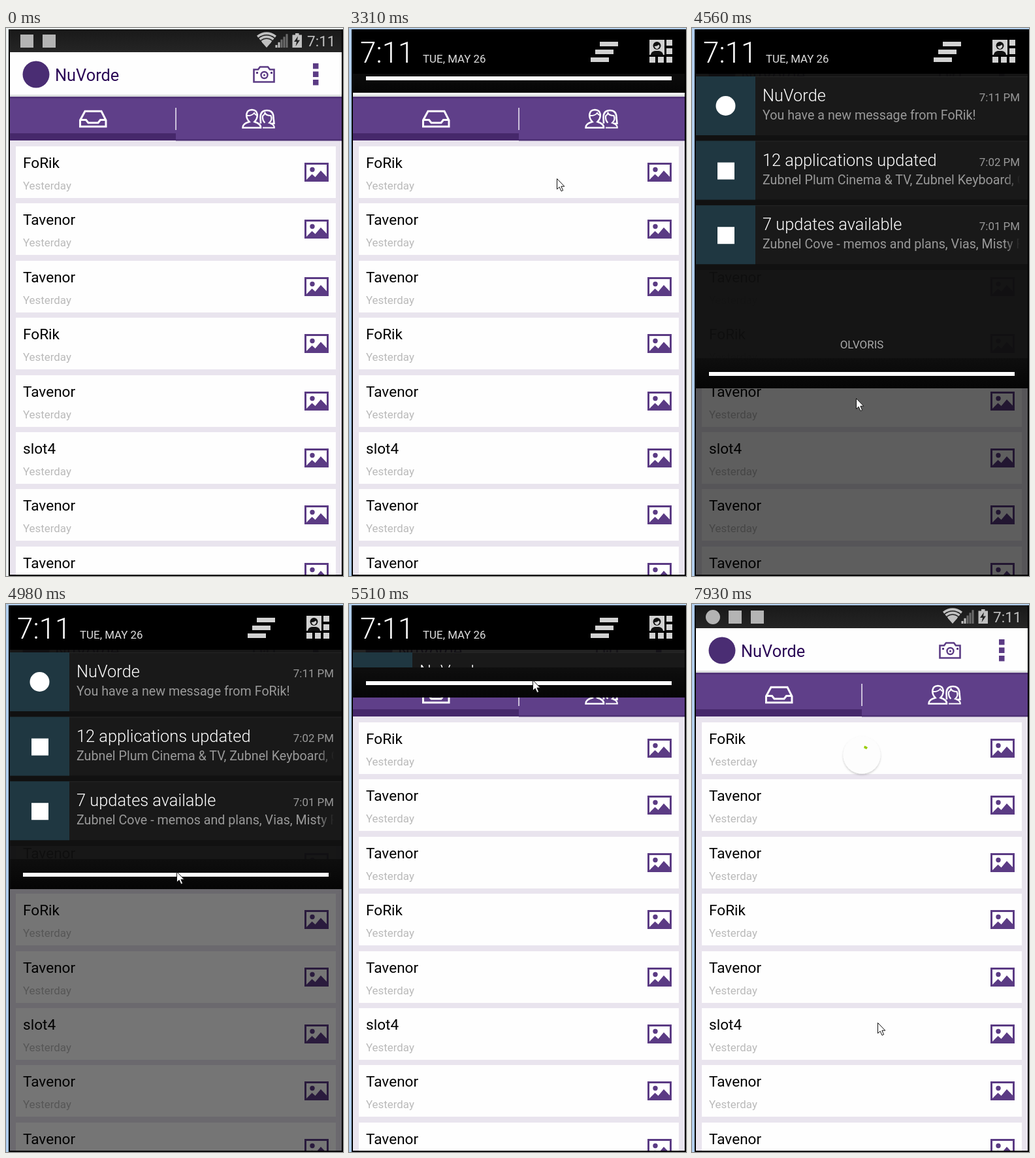
Animation of 516 by 838 pixels, one loop 8000 ms. Source, as an HTML page:

```html
<!DOCTYPE html>
<html lang="en">
<head>
<meta charset="utf-8">
<title>Notification demo</title>
<style>
html, body { margin: 0; width: 100%; height: 100%; overflow: hidden; }
svg { display: block; width: 516px; height: 838px; font-family: Roboto, sans-serif; }
text { white-space: pre; }
.light { font-weight: 300; }
</style>
</head>
<body>
<svg id="stage" viewBox="0 0 516 838"></svg>
<script>
const LOOP = 8000;
const PURPLE = '#5b3b84';
const APP = 'NuVorde';
const NOTE = 'You have a new message from FoRik!';

const text = (x, y, size, fill, str, extra = '') =>
  `<text x="${x}" y="${y}" font-size="${size}" fill="${fill}" ${extra}>${str.replace('&', '&amp;')}</text>`;
const rect = (x, y, w, h, fill, extra = '') =>
  `<rect x="${x}" y="${y}" width="${w}" height="${h}" fill="${fill}" ${extra}/>`;
const dot = (x, y, r, fill) => `<circle cx="${x}" cy="${y}" r="${r}" fill="${fill}"/>`;
const line = (d, stroke, width) =>
  `<path d="${d}" fill="none" stroke="${stroke}" stroke-width="${width}"/>`;
const shape = (d, fill) => `<path d="${d}" fill="${fill}"/>`;
const repeat = (n, make) => Array.from({ length: n }, (_, i) => make(i)).join('');

function card(name, i) {
  return `<g transform="translate(0 ${Math.round(181 + 87.4 * i)})">
    ${rect(15, 0, 490, 79, '#fefefe')}
    ${text(26, 33, 22.6, '#000', name)}
    ${text(26, 66, 16.9, '#bababa', 'Yesterday')}
    <rect x="458.5" y="26.5" width="34" height="26" fill="#fff" stroke="${PURPLE}" stroke-width="3"/>
    ${dot(469, 35.5, 3.7, PURPLE)}
    ${shape('M459 52L468.5 42.5 473.5 47 482 37 492 47.5V52Z', PURPLE)}
  </g>`;
}

function actionBar() {
  return rect(6, 37, 508, 66, '#fefefe') + rect(6, 102, 508, 3, '#dcdfdf') +
    dot(46, 71, 20.5, '#4a2d73') + text(75, 81, 25.4, '#2c0a57', APP) +
    line('M379.5 63.5H386L389 59.5H401L404 63.5H410.5V82.5H379.5Z', PURPLE, 2.6) +
    `<circle cx="395.5" cy="72" r="5" fill="none" stroke="${PURPLE}" stroke-width="2.4"/>` +
    dot(395.5, 72, 1.6, PURPLE) + rect(383, 67, 3, 3, PURPLE) + rect(405, 67, 3, 3, PURPLE) +
    repeat(3, i => rect(470, 54 + 12.5 * i, 8.5, 8.5, PURPLE));
}

function tabs() {
  const white = '#fdfcff';
  return rect(6, 105, 508, 67, '#5f3f89') + rect(6, 105, 508, 3, '#523579') +
    rect(6, 161, 254, 11, '#46286b') + rect(260, 170, 254, 2.5, '#4d3074') +
    rect(259.2, 122, 1.8, 34, '#d8cfe4') +
    line('M113.5 141L121 127.2H146L153 141V150.8H113.5ZM113.5 140.5H122.5L126 145H141L144.5 140.5H153', white, 3) +
    line('M362.5 152.5C362 147 367 145 372.5 143.5C366.5 137 366 125.5 376.5 125C387 125.5 386.5 137 380.5 143.5C385 145 390.5 147 390 152.5Z', white, 2.6) +
    line('M368.5 134C374 134.5 378 132.5 380 130C381.5 132.5 383 133.5 385 134', white, 2) +
    line('M390 146L389.5 137C389.5 129 394 126 399.5 126C405 126 409.5 129 409.5 137L410.5 146H405', white, 2.6) +
    line('M393 152.5H410.8C411 148.5 407.5 146.5 403 145C407.5 141 407 137 405.5 134C401 134 397.5 132 396.5 130C395.5 133 394 134 393 134.5C392.5 139 393 142 396.5 145', white, 2.2);
}

function statusRight() {
  const grey = '#c0c0c0';
  const wifi = repeat(3, i => {
    const r = 24 - 5.7 * i, dx = r * 0.58, y = 30 - r * 0.7;
    return line(`M${399 - dx} ${y}Q399 ${y - r * 0.42} ${399 + dx} ${y}`, grey, 3.6);
  });
  const bars = repeat(5, i =>
    rect(412.5 + i * 4, 26 - i * 4.2, 3, 4 + i * 4.2, i < 2 ? grey : '#6c6c6c'));
  return wifi + shape('M392 22Q399 16.5 406 22L399 30Z', grey) + bars +
    rect(443, 8, 5.5, 3, grey) + rect(438.5, 10.5, 14.5, 19.5, grey) +
    shape('M447 12.5L441 21H445L443.5 28 450 18.5H446Z', '#222') +
    text(461, 28, 22.6, grey, '7:11');
}

const statusSquares = x => repeat(2, i => rect(x + 34 * i, 10, 20, 20, '#b4b4b4'));

function noteRow(i, title, body, time, icon) {
  return `<g transform="translate(0 ${74 + 98.6 * i})">
    ${rect(6, 0, 508, 90, '#191919')}${rect(97, 0, 417, 1, '#252525')}
    ${rect(6, 90, 508, 8.6, '#111')}${rect(6, 0, 91, 90, '#1f3741')}${icon}
    ${text(108, 38, 25.4, '#fff', title, 'class="light"')}
    ${text(502, 38, 16.9, '#999', time, 'text-anchor="end"')}
    ${text(108, 66, 19.7, '#999', body)}
    ${rect(478, 45, 36, 30, 'url(#fade)')}
  </g>`;
}

function panelHeader() {
  const grey = '#d2d2d2';
  const tile = (col, row) => rect(460 + 13 * col, 18 + 13 * row, 9, 9, grey);
  return rect(6, 2, 508, 68, '#000') +
    text(17, 53, 44, '#fff', '7:11', 'class="light"') +
    text(113, 53, 16.9, '#ddd', 'TUE, MAY 26') +
    repeat(3, i => rect(384 - i * 7, 21 + i * 12, 28, 7, grey)) +
    repeat(3, i => tile(i, 2)) + repeat(2, i => tile(2, i)) +
    rect(460, 18, 23, 23, grey) + dot(471.5, 27, 6, '#111') +
    shape('M462 41C463 35 468 35 471.5 35S480 35 481 41Z', '#111') +
    shape('M467.5 28Q471.5 28 474.5 25.5L475.5 28Q471.5 36 467.5 28Z', grey);
}

const names = ['FoRik', 'Tavenor', 'Tavenor', 'FoRik', 'Tavenor', 'slot4', 'Tavenor', 'Tavenor'];
const square = rect(39, 33, 26, 26, '#fff');

document.getElementById('stage').innerHTML = `
<defs>
  <linearGradient id="fade"><stop stop-color="#191919" stop-opacity="0"/><stop offset=".67" stop-color="#191919"/></linearGradient>
  <linearGradient id="bar" x2="0" y2="1"><stop stop-color="#191919"/><stop offset="1" stop-color="#252525"/></linearGradient>
  <linearGradient id="foot" x2="0" y2="1"><stop stop-color="#0e0e0e"/><stop offset="1" stop-color="#050505"/></linearGradient>
  <filter id="shadow" x="-30%" y="-30%" width="160%" height="160%"><feDropShadow dx="0" dy="1.8" stdDeviation="1.8" flood-opacity=".2"/></filter>
  <clipPath id="barClip"><rect x="6" y="2" width="508" height="35"/></clipPath>
  <clipPath id="panelClip"><rect id="panelBox" x="6" y="2" width="508"/></clipPath>
  <clipPath id="rowsClip"><rect id="rowsBox" x="6" y="70" width="508"/></clipPath>
</defs>
<rect id="edge" width="516" height="838"/>
${rect(4, 2, 512, 836, '#000')}
${rect(6, 172, 508, 664, '#e9e4ee')}
${names.map(card).join('')}
${actionBar()}${tabs()}
<g id="spinner"><circle r="28.5" fill="#fdfdfd" filter="url(#shadow)"/>
  <path id="arc" fill="none" stroke="#99cc00" stroke-width="3.6"/>
  <path id="head" d="M-5 0H5L0 6Z" fill="#99cc00"/></g>
<g clip-path="url(#barClip)">
  ${rect(6, 2, 508, 35, 'url(#bar)')}
  <rect id="tickerBack" x="6" y="2" width="508" height="35"/>
  <g id="icons">
    <g id="before">${statusSquares(22)}</g>
    <g id="after">${dot(32, 20, 11, '#b4b4b4')}${statusSquares(56)}</g>
    ${statusRight()}
  </g>
  <g id="ticker">${dot(32, 19, 11, '#fff')}${text(55, 26, 19.7, '#fff', APP + ': ' + NOTE)}</g>
</g>
<rect id="scrim" x="6" y="2" width="508" height="834"/>
<g id="panel" clip-path="url(#panelClip)">
  ${rect(6, 70, 508, 766, '#101010', 'opacity=".92"')}
  <g clip-path="url(#rowsClip)">
    ${noteRow(0, APP, NOTE, '7:11 PM', dot(51.5, 45, 15, '#fff'))}
    ${noteRow(1, '12 applications updated', 'Zubnel Plum Cinema & TV, Zubnel Keyboard, Co', '7:02 PM', square)}
    ${noteRow(2, '7 updates available', 'Zubnel Cove - memos and plans, Vias, Misty Ro', '7:01 PM', square)}
    ${text(260, 490, 16.9, '#aaa', 'OLVORIS', 'text-anchor="middle"')}
  </g>
  <g id="footer">${rect(6, -46, 508, 46, 'url(#foot)', 'opacity=".97"')}${rect(26, -25, 468, 6, '#fff')}</g>
  ${panelHeader()}
</g>
${rect(4, 836, 512, 2, '#000')}${rect(514, 2, 2, 836, '#000')}
<path id="cursor" d="M.5.5V16.5L4.2 13.2 7 19.5 9.6 18.3 6.9 12.2H11.8Z" fill="#fff" stroke="#111"/>`;

const $ = id => document.getElementById(id);
const set = (id, attrs) => { for (const k in attrs) $(id).setAttribute(k, attrs[k]); };
const show = (id, on) => set(id, { display: on ? 'inline' : 'none' });
const part = (t, from, to) => Math.max(0, Math.min(1, (t - from) / (to - from)));
const ease = p => p * p * (3 - 2 * p);
const mix = (a, b, p) => a + (b - a) * p;

// Moments of the story, in ms.
const TICKER = 400, POINTER = 2160, PULL = 2830, RELEASE = 4560, SHUT = 5650, CLOSED = 5850,
  SWIPE = 6300, REFRESH = 6900;
const OPEN_BOTTOM = 551;

// Each eased stroke of the hand: start, end, target x, target y.
const strokes = [
  [1900, PULL, 360, 16],
  [PULL, 3960, 251, 566],
  [RELEASE, SHUT, 282, 95],
  [5710, 6880, 230, 729],
  [REFRESH, 7700, 284, 640],
];

function pointer(t) {
  let x = 543, y = 275;
  for (const [from, to, tx, ty] of strokes) {
    const p = ease(part(t, from, to));
    x = mix(x, tx, p);
    y = mix(y, ty, p);
  }
  return { x: Math.round(x), y: Math.round(y) };
}

// The panel opens late behind the hand, then hangs just below it while closing.
function panelBottom(t, y) {
  if (t < RELEASE) return Math.round(mix(72, OPEN_BOTTOM, ease(part(t, 3200, 3975))));
  return Math.round(Math.min(OPEN_BOTTOM, y + 27) * (1 - part(t, SHUT, 5900)));
}

function arcPath(start, sweep, r) {
  const point = deg => {
    const a = (deg - 90) * Math.PI / 180;
    return `${r * Math.cos(a)} ${r * Math.sin(a)}`;
  };
  return `M${point(start)}A${r} ${r} 0 ${sweep > 180 ? 1 : 0} 1 ${point(start + sweep)}`;
}

function drawStatus(t) {
  const p = t >= 500 && t < PULL ? part(t, TICKER, 890) : 0;
  set('tickerBack', { opacity: p });
  set('icons', { opacity: 1 - p, transform: `translate(0 ${-35 * p})` });
  set('ticker', { opacity: p, transform: `translate(0 ${35 * (1 - p)})` });
  show('before', t < PULL);
  show('after', t >= PULL);
}

function drawPanel(t, y) {
  const open = t >= PULL && t < CLOSED;
  show('panel', open);
  show('scrim', open);
  if (!open) return;
  const bottom = panelBottom(t, y);
  const f = Math.max(0, (Math.min(bottom, 505) - 2) / 834 * 1.2 - 0.2);
  set('scrim', { opacity: 0.715 * (0.5 + 0.5 * Math.cos(Math.PI * (1 - f) ** 2)) });
  set('panelBox', { height: Math.max(0, bottom - 2) });
  set('rowsBox', { height: Math.max(0, bottom - 116) });
  set('footer', { transform: `translate(0 ${bottom})` });
}

function drawSpinner(t) {
  show('spinner', t >= SWIPE);
  if (t < SWIPE) return;
  const dragging = t < REFRESH;
  const pull = part(t, SWIPE - 30, SWIPE + 270), turn = part(t, REFRESH, 7930);
  const start = dragging ? -60 + 30 * pull : -30 + 406 * turn;
  const sweep = dragging ? 288 * pull : 288 - 266 * turn;
  const y = mix(mix(212, 308, ease(part(t, SWIPE, 6850))), 231, ease(part(t, REFRESH, 7130)));
  const opacity = 0.3 + 0.7 * pull;
  set('spinner', { transform: `translate(260 ${y}) scale(${pull})` });
  set('arc', { d: arcPath(start, sweep, 13), opacity });
  set('head', { transform: `rotate(${start + sweep - 90}) translate(13 0)`, opacity });
  show('head', dragging);
}

function draw(t) {
  const { x, y } = pointer(t);
  set('edge', { fill: t < PULL ? '#eaf0f0' : '#b0cdec' });
  show('cursor', t >= POINTER);
  set('cursor', { transform: `translate(${x} ${y})` });
  drawStatus(t);
  drawPanel(t, y);
  drawSpinner(t);
}

const began = performance.now();
function loop() {
  draw((performance.now() - began) % LOOP);
  requestAnimationFrame(loop);
}
loop();
</script>
</body>
</html>
```
